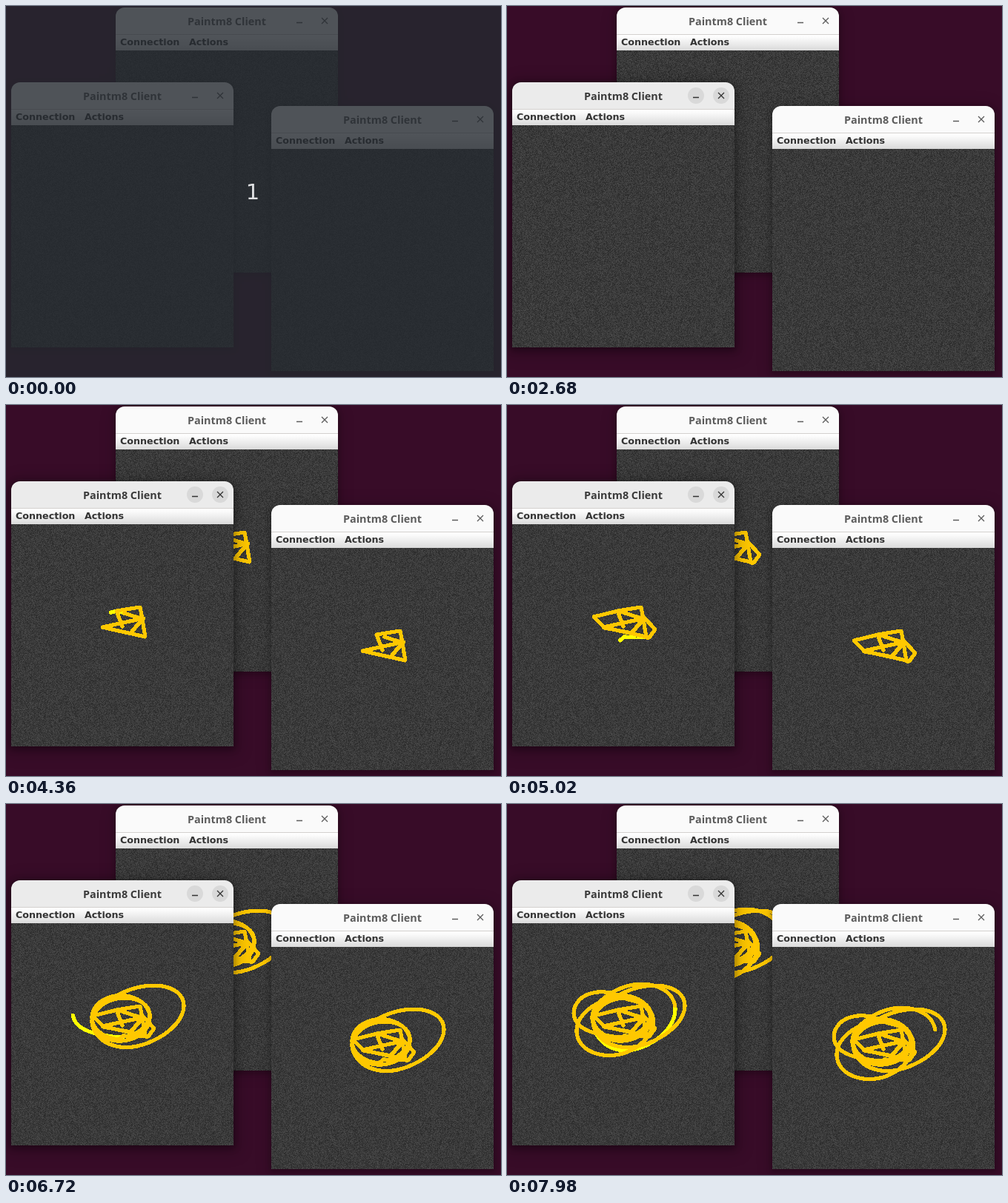
These frames come from a looping animation (668 by 501 pixels, 8 s). An HTML page with a canvas:

```html
<!DOCTYPE html>
<html lang="en">
<head>
<meta charset="utf-8">
<title>Shared drawing</title>
<style>
  html, body { margin: 0; width: 100%; height: 100%; overflow: hidden; background: #380c28; }
  #stage { position: relative; width: 668px; height: 501px; overflow: hidden; background: #380c28; }
  .win {
    position: absolute; width: 300px; height: 358px; overflow: hidden;
    border-radius: 12px 12px 0 0; background: #3a3a3a;
    box-shadow: 0 2px 6px 2px rgba(0, 0, 0, .2), 0 1px 18px 6px rgba(0, 0, 0, .1);
  }
  .win.focus { box-shadow: 0 2px 8px 2px rgba(0, 0, 0, .3), 0 3px 20px 8px rgba(0, 0, 0, .16); }
  .win canvas { position: absolute; left: 0; top: 58px; }
  .win svg, #veil { position: absolute; left: 0; top: 0; }
  .bar { fill: #fafafa; }
  .title { font: bold 14.4px "Open Sans", "Noto Sans", sans-serif; fill: #5c5c5c; text-anchor: middle; }
  .menu { font: bold 12.7px "DejaVu Sans", sans-serif; fill: #333; }
  .disc { fill: none; }
  .glyph { fill: none; stroke: #5c5c5c; stroke-width: 1.3; }
  .focus .bar { fill: #ebebeb; }
  .focus .title { fill: #3a3a3a; }
  .focus .disc { fill: #d9d9d9; }
  .focus .glyph { stroke: #333; }
  .ink { fill: none; stroke: #ffc800; stroke-width: 5.2; stroke-linecap: round; stroke-linejoin: round; shape-rendering: crispEdges; }
  .pending { stroke: #ff0; }
  #veil text { font: 29px "DejaVu Sans", sans-serif; fill: #dfe0e2; text-anchor: middle; }
</style>
</head>
<body>
<div id="stage"></div>
<script>
const LOOP = 8000, COUNTDOWN = 120, FOCUS = 2680;
const START = 2800, SPIN = 5020, STEP = 5;
const stage = document.getElementById('stage');

// First the pen zigzags through these corners.
const corners = [
  [157, 299], [149, 278], [181, 273], [188, 313], [130, 300], [186, 288], [168, 308], [184, 289],
  [150, 278], [117, 286], [132, 301], [168, 308], [185, 287], [200, 303], [192, 314], [158, 313]
];

// Then it circles, drifting from one ellipse to the next.
const oval = { cx: 155, cy: 289, rx: 39, ry: 28 };
const wide = { cx: 178, cy: 288, rx: 62, ry: 38 };
const peak = { cx: 147, cy: 280, rx: 62, ry: 46 };
const low = { cx: 148, cy: 300, rx: 54, ry: 41 };
const last = { cx: 169, cy: 288, rx: 58, ry: 41 };
const orbit = [
  [0.26, oval], [1.4, oval], [1.75, wide], [2.25, wide], [2.5, oval], [3.3, oval], [3.6, peak],
  [3.8, oval], [4.25, low], [4.55, low], [4.8, oval], [5.4, oval], [5.75, last], [6.25, last], [6.5, oval]
];

const mix = (a, b, u) => a + (b - a) * u;

function zigzag(t) {
  const speed = 0.274, ramp = 868, x = t - START;
  let left = speed * (x < ramp ? x * x / (2 * ramp) : x - ramp / 2);
  for (let i = 1; i < corners.length; i++) {
    const [ax, ay] = corners[i - 1], [bx, by] = corners[i];
    const len = Math.hypot(bx - ax, by - ay);
    if (left < len) return [mix(ax, bx, left / len), mix(ay, by, left / len)];
    left -= len;
  }
  return corners[corners.length - 1];
}

function turnAt(t) {
  const s = (t - SPIN) / 1000;
  return 0.26 + 1.711 * s + 0.125 * s * s;
}

function circling(t) {
  const turn = turnAt(t), angle = turn * 2 * Math.PI;
  const i = Math.max(1, orbit.findIndex(([end]) => end > turn));
  const [from, a] = orbit[i - 1], [to, b] = orbit[i];
  const u = (turn - from) / (to - from), ease = u * u * (3 - 2 * u);
  const get = key => mix(a[key], b[key], ease);
  const rx = get('rx'), lean = (rx - 36) * 0.5;
  const wobble = 3 * Math.cos(turn * 5);
  return [
    get('cx') + rx * Math.cos(angle),
    get('cy') + get('ry') * Math.sin(angle) - lean * Math.cos(angle) + wobble
  ];
}

const route = [];
for (let t = START; t <= LOOP; t += STEP) {
  const [x, y] = t < SPIN ? zigzag(t) : circling(t);
  route.push(x.toFixed(1) + ' ' + y.toFixed(1));
}

function trace(from, to) {
  const index = t => Math.max(0, Math.round((t - START) / STEP));
  return to > from && to > START ? 'M' + route.slice(index(from), index(to) + 1).join('L') : '';
}

function tick(t) {
  const p = (t - 2640) % 140;
  return t - p + (p < 20 ? 0 : p < 40 ? 20 : 40);
}

function grain(canvas) {
  const ctx = canvas.getContext('2d'), img = ctx.createImageData(300, 300);
  let seed = 20817;
  for (let i = 0; i < img.data.length; i += 4) {
    seed = (seed * 1664525 + 1013904223) % 4294967296;
    img.data.fill(42 + 32 * seed / 4294967296, i, i + 3);
    img.data[i + 3] = 255;
  }
  ctx.putImageData(img, 0, 0);
}

function makeWindow(x, y) {
  const win = document.createElement('div');
  win.className = 'win';
  win.style.left = x + 'px';
  win.style.top = y + 'px';
  win.innerHTML = `
    <canvas width="300" height="300"></canvas>
    <svg width="300" height="358">
      <defs><linearGradient id="menu${x}" x2="0" y2="1">
        <stop stop-color="#fff"/><stop offset=".15" stop-color="#fcfcfc"/><stop offset="1" stop-color="#dadada"/>
      </linearGradient></defs>
      <rect class="bar" width="300" height="36"/>
      <rect y="36" width="300" height="1" fill="#d3d0ce"/>
      <rect y="37" width="300" height="21" fill="url(#menu${x})"/>
      <text class="title" x="150" y="24">Paintm8 Client</text>
      <circle class="disc" cx="248" cy="18" r="11"/>
      <circle class="disc" cx="282" cy="18" r="11"/>
      <path class="glyph" d="M244 20.5h8M278 14l8 8M286 14l-8 8"/>
      <text class="menu" x="6" y="51">Connection</text>
      <text class="menu" x="99" y="51">Actions</text>
      <g transform="translate(-7 -103)">
        <path class="ink pending"/><path class="ink shared"/>
      </g>
    </svg>`;
  grain(win.querySelector('canvas'));
  stage.append(win);
  return win;
}

makeWindow(148, 2);
makeWindow(358, 135);
const active = makeWindow(7, 103);
stage.insertAdjacentHTML('beforeend', `
  <svg id="veil" width="668" height="501">
    <rect width="668" height="501" fill="rgb(37,42,48)" fill-opacity=".8"/>
    <text x="333" y="261">1</text>
  </svg>`);
const veil = document.getElementById('veil');
const pending = active.querySelector('.pending');
const shared = stage.querySelectorAll('.shared');

// Local ink is yellow until the server sends it back to every client.
function render(time) {
  const t = tick(time);
  const lag = Math.max(20, Math.min(180, 30 + (t - 3800) / 14));
  const echoed = trace(START, t - lag);
  veil.style.display = time < COUNTDOWN ? '' : 'none';
  active.classList.toggle('focus', time >= FOCUS);
  pending.setAttribute('d', trace(START, t));
  shared.forEach(path => path.setAttribute('d', echoed));
}

function loop() {
  render(performance.now() % LOOP);
  requestAnimationFrame(loop);
}
loop();
</script>
</body>
</html>
```
